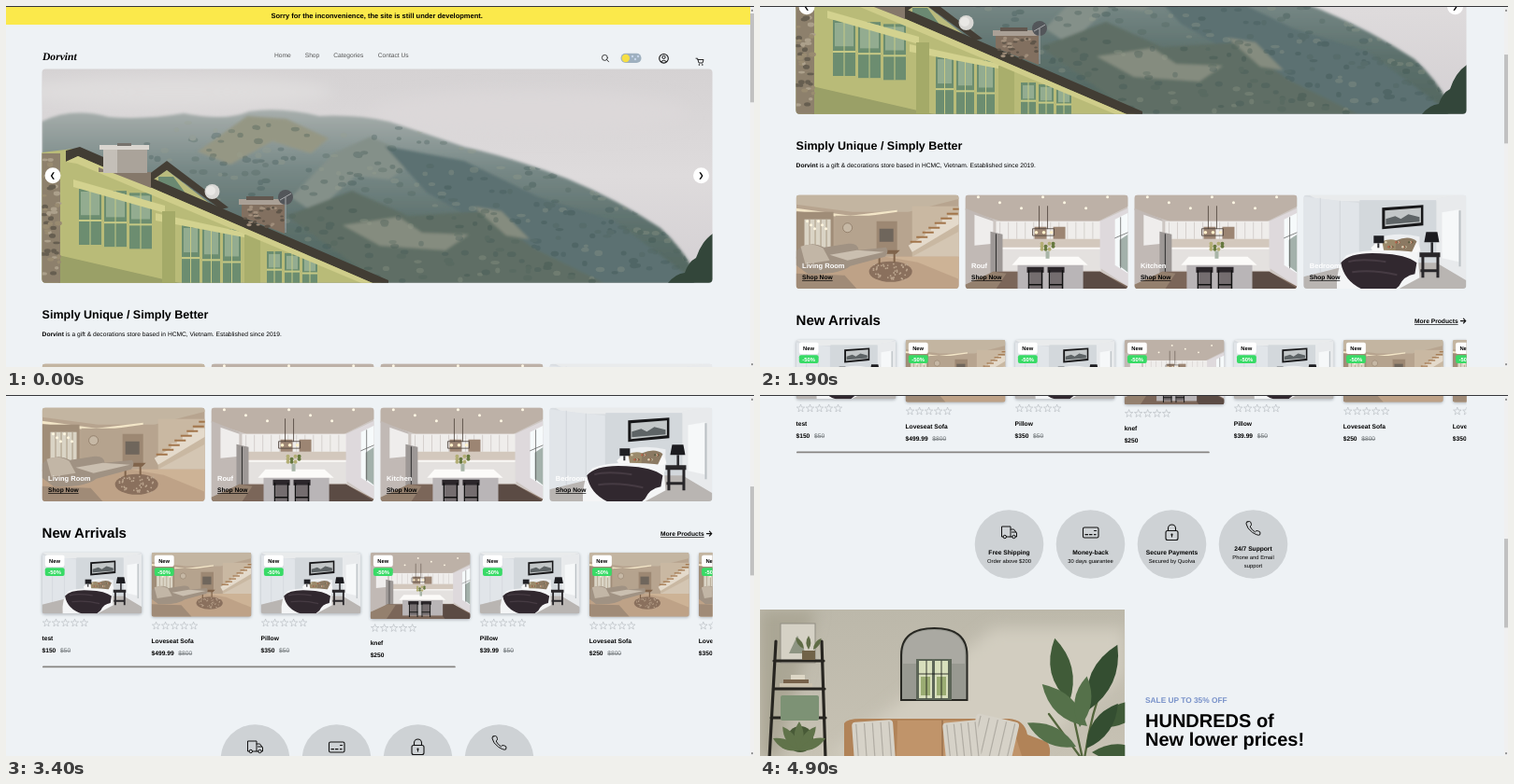
An HTML page for the animation above (5000 ms loop, 800 px wide and 387 px high).

```html
<!DOCTYPE html>
<html lang="en">
<head>
<meta charset="utf-8">
<title>Home decor store</title>
<style>
html, body { margin: 0; width: 100%; height: 100%; overflow: hidden; background: #eef2f5; }
svg { display: block; }
text { font-family: "Liberation Sans", Arial, sans-serif; text-rendering: geometricPrecision; }
.b { font-weight: bold; }
.u { font-weight: bold; text-decoration: underline; }
.m { text-anchor: middle; }
.line { fill: none; stroke: #111; stroke-linecap: round; stroke-linejoin: round; }
</style>
</head>
<body>
<script>
const rect = (x, y, w, h, fill, more = '') => `<rect x="${x}" y="${y}" width="${w}" height="${h}" fill="${fill}" ${more}/>`;
const circle = (x, y, r, fill, more = '') => `<circle cx="${x}" cy="${y}" r="${r}" fill="${fill}" ${more}/>`;
const path = (d, fill, more = '') => `<path d="${d}" fill="${fill}" ${more}/>`;
const line = (d, width = 1, more = '') => `<path d="${d}" class="line" stroke-width="${width}" ${more}/>`;
const text = (x, y, str, cls = '', size = 6.67, fill = '#000') =>
  `<text x="${x}" y="${y}" class="${cls}" font-size="${size}" fill="${fill}">${str}</text>`;
const at = (x, y, body) => `<g transform="translate(${x} ${y})">${body}</g>`;
const times = (n, f) => Array.from({ length: n }, (_, i) => f(i)).join('');

let seed = 7;
const rnd = (a, b) => a + (b - a) * ((seed = seed * 16807 % 2147483647) / 2147483647);

const gradient = (id, ...stops) => `<linearGradient id="${id}" x2="0" y2="1">${
  stops.map((c, i) => `<stop offset="${i / (stops.length - 1)}" stop-color="${c}"/>`).join('')}</linearGradient>`;

// Room pictures, all 174 wide
const rooms = {
  sofa: { h: 112, art: () =>
    rect(0, 0, 174, 112, '#b7a48f') +
    path('M0 0H174V10L120 24H60L0 16Z', '#c3b5a1') +
    path('M0 20L58 28L108 22V24L58 31L0 23Z', '#f3e6c8') +
    rect(0, 24, 40, 50, '#a08d78') + rect(9, 32, 28, 34, '#dad4c5') +
    times(4, i => rect(14 + i * 6, 32, 1, 34, '#a99a84')) +
    times(6, i => circle(12 + i * 4, 34 + i % 3 * 4, 1.5, '#fff6df')) +
    rect(42, 28, 44, 45, '#b5a38e') + circle(55, 41, 5, '#c6b8a5', 'stroke="#8d7965" stroke-width=".8"') +
    rect(86, 34, 22, 34, '#9d8873') + rect(89, 42, 15, 14, '#6f665c') +
    rect(124, 18, 50, 55, '#c9b8a2') +
    path('M120 60L138 49V44H144V40H150V36H156V32H162V28H174V37L124 67Z', '#e4dacb') +
    times(8, i => rect(122 + i * 6.5, 55 - i * 5, 12, 2, '#a2754b')) +
    path('M124 72L174 45V72Z', '#d4c6b3') +
    rect(0, 72, 174, 40, '#bea287') + path('M95 72H174V96L130 78Z', '#cdb396') +
    `<ellipse cx="101" cy="88" rx="23" ry="11" fill="#8a705d"/>` +
    times(50, () => circle(rnd(82, 120).toFixed(1), rnd(79, 97).toFixed(1), .9, '#bca68f')) +
    path('M84 65H111L107 69H88ZM88 68H90V80H88ZM104 68H106V78H104Z', '#80644b') +
    path('M5 62Q18 55 30 62L56 58Q66 57 67 65L96 62Q100 66 95 72L58 82Q45 92 12 90L0 81V66Z', '#a09283') +
    path('M5 61Q18 56 29 63L36 76L10 80Z', '#c2b6a6') +
    path('M36 70L65 65L94 67L55 76Z', '#cabfb0') +
    path('M0 90L52 92L70 112H0Z', '#a08b77') },
  kitchen: { h: 116, art: () =>
    rect(0, 0, 174, 116, '#cdc6c2') +
    path('M0 0H174V20L142 36H38L0 24Z', '#bdb1a7') +
    times(7, i => circle(14 + i * 23, 10 + i % 3 * 6, 1.5, '#fff7e4')) +
    path('M0 22L30 34V102L0 116Z', '#c1b9b5') + path('M10 29L30 36V60L10 62Z', '#efedec') +
    rect(33, 36, 112, 32, '#efedeb') + rect(33, 55, 112, 10, '#d3c8bd') +
    times(12, i => rect(37 + i * 9, 37, .6, 18, '#c4bdba')) +
    rect(74, 42, 13, 13, '#9c8573') + rect(94, 42, 13, 13, '#9c8573') +
    rect(33, 65, 112, 24, '#e4e1df') + rect(33, 64, 112, 2, '#f9f7f5') +
    path('M27 47L40 50V94L27 101Z', '#9d9896') + line('M33 50V96', .8, 'stroke="#443d39"') +
    path('M144 36L174 22V106L144 86Z', '#ded9dc') + path('M160 34L174 27V92L160 83Z', '#f6fafb') +
    path('M165 56L174 50V91L165 84Z', '#a3b1ab') + line('M160 54L174 48M166 32V86', .7, 'style="stroke:#555"') +
    path('M30 90H144L174 106V116H0V108Z', '#7b6659') + path('M110 90H144L174 108V116H130Z', '#5b4b44') +
    path('M0 104L30 90L44 92L28 116H0Z', '#94806e') +
    line('M72 51V44H95V51ZM79 44V20M88 44V20', .8, 'style="stroke:#4b4039"') + times(3, i => circle(76 + i * 8, 48, 1.8, '#fff1cb')) +
    path('M58 74H121L131 83H50Z', '#fcfbf9') + rect(56, 83, 70, 27, '#b9b5b7') +
    times(2, i => rect(66 + i * 22, 85, 18, 6, '#2b262a') + rect(69 + i * 22, 91, 13, 18, '#746d6f') +
      line(`M${68 + i * 22} 89V112M${82 + i * 22} 89V112M${68 + i * 22} 104H${82 + i * 22}`, 1.5)) +
    rect(86, 68, 4, 8, '#a8b5a7') + times(9, i => circle(82 + i % 4 * 4, 60 + i % 3 * 3, 2, i % 2 ? '#66783e' : '#b3ae75')) },
  bed: { h: 107, art: () =>
    rect(0, 0, 174, 107, '#d9dde1') + path('M0 0H174L150 10H18Z', '#e9ebec') +
    path('M0 5L60 12V78L0 91Z', '#e1e5e9') + line('M18 7V86M39 10V81M60 12V76', .5, 'style="stroke:#bfc4c9"') +
    rect(60, 9, 82, 67, '#d3d8dc') + path('M142 7L174 2V96L142 78Z', '#e8eaec') +
    path('M148 22L166 19V75L148 71Z', '#f6f8f9') + rect(166, 20, 2, 60, '#bac0c4') +
    path('M84 17L128 14V36L84 40Z', '#171719') + path('M87 20L125.500 17V33L87 37Z', '#c3c7c8') +
    path('M88 29L98 26L104 29L112 24L124 27V32L88 35Z', '#5e6466') +
    path('M0 91L60 76H142L174 95V107H0Z', '#b9b5b2') +
    path('M76 50Q100 42 124 48V72H76Z', '#edeff1') +
    path('M72 60Q83 48 94 59L90 67H76Z', '#f8f8f8') + path('M110 56Q122 48 125 63L113 70Z', '#f8f8f8') +
    path('M84 53Q96 48 104 55L100 66L86 64Z', '#9b8a6b') + path('M99 52Q113 46 121 53L115 66L98 66Z', '#8b7962') +
    times(18, i => circle(88 + i * 7 % 29, 54 + i * 5 % 10, 1.2, ['#d8cdb1', '#5d5c42', '#b4644c'][i % 3])) +
    path('M46 68Q70 59 122 65L124 92L96 107H36Q34 80 46 68Z', '#f4f5f6') +
    path('M40 76Q50 64 82 66Q110 67 121 76L119 88Q107 90 102 101L95 107H70Q44 99 40 76Z', '#31282f') +
    path('M48 75Q62 71 88 75M52 86Q74 83 100 89', 'none', 'stroke="#463b43" stroke-width="2"') +
    rect(75, 47, 11, 8, '#202024') + rect(79, 55, 2, 5, '#303034') +
    path('M131 43H143L145 54H129Z', '#1c1c20') + rect(136, 54, 2.5, 13, '#27272b') +
    path('M124 65H146V70H124ZM126 70H129V92H126ZM142 70H145V92H142ZM125 83H145V86H125Z', '#29272a') }
};

const room = (name, x, y, w, h) =>
  `<svg x="${x}" y="${y}" width="${w}" height="${h}" viewBox="0 0 174 ${rooms[name].h}" preserveAspectRatio="xMidYMid slice"><use href="#${name}"/></svg>`;

const header =
  rect(0, 0, 796, 20, '#fbe94b') +
  text(396.7, 13, 'Sorry for the inconvenience, the site is still under development.', 'b m', 7.5) +
  `<text x="39" y="57.5" font-size="11.6" font-weight="bold" font-style="italic" style="font-family:'Liberation Serif',serif">Dorvint</text>` +
  [['Home', 287], ['Shop', 319.7], ['Categories', 350.2], ['Contact Us', 397.7]]
    .map(([s, x]) => text(x, 54.6, s, '', 6.67, '#555')).join('') +
  line('M642.6 57.6L644.6 59.8M643.4 55.4A3 3 0 1 1 637.4 55.4A3 3 0 1 1 643.4 55.4', .8) +
  rect(657.5, 50.7, 22, 10.3, '#9eb0bf', 'rx="5.1"') + circle(662.8, 56, 4.2, '#f6df45') +
  times(3, i => circle(670 + i * 3, 54 + i % 2 * 3, 1.2, '#c7d7ec')) +
  circle(703.5, 56.3, 4.8, 'none', 'stroke="#111" stroke-width="1.1"') + circle(703.5, 54.9, 1.6, 'none', 'stroke="#111"') +
  line('M700.3 59.5Q703.5 56.9 706.7 59.5', 1) +
  line('M738 56.2H739.6L741 61H745L746 57.5H740', .9) + circle(741.4, 63, .8, '#111') + circle(744.8, 63, .8, '#111');

const mountain = 'M38 124Q70 108 110 119Q150 122 190 115Q235 124 260 113Q295 108 335 118Q375 116 410 124Q450 137 490 151Q540 162 600 185Q655 208 700 238Q722 258 736 284V297H38Z';
const pane = (x, y, w, h, n, slope) => times(n, i => {
  const px = x + i * w, py = y + i * w * slope;
  return rect(px, py, w - 3, h, '#6c8d70') + rect(px + 2, py + 3, w - 7, h * .42, '#93ac90') +
    rect(px, py + h * .55, w - 3, 2, '#c6c985') + rect(px + w / 2 - 2, py, 1, h, '#c6c985');
});
const dots = (n, x0, x1, y0, y1, r, colors) => times(n, i =>
  `<ellipse cx="${rnd(x0, x1).toFixed(1)}" cy="${rnd(y0, y1).toFixed(1)}" rx="${rnd(r / 2, r).toFixed(1)}" ry="${rnd(r / 3, r / 1.6).toFixed(1)}" fill="${colors[i % colors.length]}"/>`);

const hero = `<g clip-path="url(#heroClip)">` +
  rect(38, 67, 718, 231, 'url(#sky)') +
  `<g filter="url(#soft)"><ellipse cx="180" cy="92" rx="170" ry="17" fill="#dfdddd"/><ellipse cx="560" cy="115" rx="170" ry="24" fill="#dcd8d9"/></g>` +
  path(mountain, 'url(#hill)', 'filter="url(#soft2)"') +
  `<g clip-path="url(#hillClip)"><g filter="url(#soft2)">` +
  path('M205 156L258 118L300 121L345 142L326 158L285 145L240 170Z', '#959784') +
  path('M305 205L350 158L390 140L440 164L410 186L374 182L330 222Z', '#849089') +
  path('M405 150L490 166L570 205L650 230L740 297H560L520 240L450 200Z', '#5c7172') +
  path('M300 225L370 198L430 225L510 220L565 260L640 297H400Z', '#5e6e65') +
  path('M360 235L420 226L445 243L495 245L470 262L400 257ZM500 215L530 220L560 250L535 246Z', '#858c7f') +
  `</g><g opacity=".28" filter="url(#soft3)">` +
  dots(420, 150, 740, 125, 297, 5, ['#354c49', '#4b625c', '#9ba18f', '#3c5352']) + `</g></g>` +
  path('M708 297Q716 287 726 286Q730 274 738 270Q744 252 756 244V297Z', '#33463a') +
  path('M148 184L172 166L238 216L230 218L172 176L153 190Z', '#443e35') +
  path('M152 190L172 176L226 218L190 215Z', '#babb7d') + path('M163 183H179L195 205H163Z', '#6b8972') +
  path('M38 157L72 153L402 297H38Z', '#b9bb78') +
  pane(78, 196, 27, 60, 3, .08) + pane(188, 235, 22, 62, 3, .1) + pane(279, 263, 19, 34, 3, .1) +
  path('M72 186L170 214V222L72 194ZM160 222L270 246V251L160 230Z', '#d3d28f') +
  path('M56 267L186 297H56Z', '#9aa067') + rect(167, 220, 14, 77, '#a4aa68') + rect(255, 245, 17, 52, '#a9ae6c') +
  path('M64 155L79 151L409 294V297H392L77 161L64 167Z', '#423d34') +
  path('M64 167L77 161L392 297H380L76 169Z', '#cfcd8a') +
  rect(38, 158, 20, 139, '#8d806c') + dots(50, 39, 57, 160, 295, 4, ['#aca08b', '#665e50', '#998b71']) +
  path('M99 178H155V195L99 173Z', '#85786a') + rect(104, 153, 47, 26, '#aaa39a') + rect(104, 153, 15, 26, '#c4bfb8') +
  rect(100, 149, 53, 5, '#dad6d0') + rect(119, 147, 15, 3, '#77736d') +
  path('M252 212H298V244L252 226Z', '#827060') + dots(34, 255, 296, 215, 237, 3, ['#a18f7c', '#5f5549']) +
  rect(249, 207, 50, 6, '#aaa096') + rect(257, 204, 29, 4, '#61574f') +
  circle(299, 205, 8, '#53565a') + path('M293 208L305 201M299 205V243', 'none', 'stroke="#a8aaac"') +
  circle(220.5, 199, 8, '#d9d8d5') + circle(219, 198, 5, '#e9e8e5') + `</g>` +
  [[50, '❮'], [743.5, '❯']].map(([x, s]) => circle(x, 181.8, 8.5, '#fff') + text(x, 184.4, s, 'm', 7.5)).join('');

const intro =
  text(38.6, 335.4, 'Simply Unique / Simply Better', 'b', 12.5) +
  text(38.6, 354, '<tspan class="b">Dorvint</tspan> is a gift &amp; decorations store based in HCMC, Vietnam. Established since 2019.');

const categories = [['Living Room', 'sofa'], ['Rouf', 'kitchen'], ['Kitchen', 'kitchen'], ['Bedroom', 'bed']]
  .map(([name, pic], i) => at(38.5 + i * 180.9, 383.6,
    `<g clip-path="url(#cardClip)">${room(pic, 0, 0, 174.3, 100.3)}</g>` +
    text(6.6, 78.6, name, 'b', 7.5, '#fff') + text(6.6, 90.5, 'Shop Now', 'u'))).join('');

const star = 'M' + Array.from({ length: 10 }, (_, i) => {
  const a = Math.PI * (i / 5 - .5), r = i % 2 ? 1.8 : 4.4;
  return (r * Math.cos(a)).toFixed(2) + ' ' + (r * Math.sin(a)).toFixed(2);
}).join('L') + 'Z';

const goods = [
  ['test', '$150', '$50', 'bed'], ['Loveseat Sofa', '$499.99', '$800', 'sofa'], ['Pillow', '$350', '$50', 'bed'],
  ['knef', '$250', '', 'kitchen'], ['Pillow', '$39.99', '$50', 'bed'],
  ['Loveseat Sofa', '$250', '$800', 'sofa'], ['Loveseat Sofa', '$350', '$800', 'sofa']
].map(([name, price, old, pic], i) => {
  const h = 107 * rooms[pic].h / 174;
  return at(38.5 + i * 117.05, 538.8,
    rect(0, 1, 107, h, '#69727b', 'rx="3" opacity=".45" filter="url(#soft2)"') +
    `<g clip-path="url(#${pic}Clip)">${room(pic, 0, 0, 107, h)}</g>` +
    rect(3.3, 3, 20.8, 12.2, '#fff', 'rx="2"') + text(13.6, 11.2, 'New', 'b m', 5.83) +
    rect(3.3, 16.4, 20.8, 8.8, '#38db66', 'rx="2"') + text(13.6, 23, '-50%', 'b m', 5.83, '#fff') +
    times(5, n => at(5 + n * 10, h + 9.8, path(star, 'none', 'stroke="#b4b9be" stroke-width=".6"'))) +
    text(0, h + 28.2, name, 'b') +
    text(0, h + 41.3, `<tspan class="b">${price}</tspan><tspan dx="4.7" fill="#6c7275" text-decoration="line-through">${old}</tspan>`));
}).join('');

const arrivals =
  text(38.6, 523.4, 'New Arrivals', 'b', 15) + text(700, 521, 'More Products', 'u') +
  line('M749.4 518.6H754.6M752.4 516.2L754.8 518.6L752.4 521', 1.1) +
  `<g clip-path="url(#rowClip)">${goods}</g>` + rect(39, 660.5, 441.8, 1.8, '#878582', 'rx=".9"');

const perk = (i, icon, title, up, ...subs) => at(266.5 + i * 87, 760,
  circle(0, 0, 36.8, '#ced2d5') + at(0, -13 - up, icon) + text(0, 11.2 - up, title, 'b m') +
  subs.map((s, n) => text(0, 20.2 - up + n * 8.6, s, 'm', 5.83)).join(''));

const perks =
  perk(0, line('M-6.5 5H-8V-6H1.5V5H-3M1.5-3H5L8 1V5H6.8M1.5 5H3.2M3 0H7.3') +
    circle(-4.7, 5, 1.7, 'none', 'stroke="#111"') + circle(5, 5, 1.7, 'none', 'stroke="#111"'), 'Free Shipping', 0, 'Order above $200') +
  perk(1, rect(-8, -5, 16.5, 11, 'none', 'stroke="#111" stroke-width="1.1" rx="1.6"') + line('M4-1.5H6M-5.5 2.7H-3M-1 2.7H1.5M4 2.7H5.5', 1.2), 'Money-back', 0, '30 days guarantee') +
  perk(2, rect(-6.5, -1.5, 13, 10, 'none', 'stroke="#111" stroke-width="1.1" rx="2"') + line('M-4-1.5V-4A4 4 0 0 1 4-4V-1.5M0 3V5', 1.1) + circle(0, 2.7, 1.1, '#111'), 'Secure Payments', 0, 'Secured by Quolva') +
  perk(3, line('M-6.5-7L-4-7.5Q-2.5-7.5-2-4.5Q-1.7-3-3.4-2Q-1.4 2 2 3.8Q3 2 5 2.7Q8 3.5 7.5 5L7 7Q5 8-1 4.2Q-6.8 0-7.5-5Q-7.6-6.7-6.5-7Z', 1), '24/7 Support', 4, 'Phone and Email', 'support');

const leaf = (x, y, len, angle, fill) =>
  `<path transform="translate(${x} ${y}) rotate(${angle})" d="M0 0Q${-len * .34} ${-len * .5} 0 ${-len}Q${len * .3} ${-len * .5} 0 0" fill="${fill}"/>`;
const cushion = (x, y, w, h, tilt) => `<g transform="translate(${x} ${y}) rotate(${tilt})">` +
  rect(0, 0, w, h, '#d6d2c8', 'rx="4"') + times(5, i => rect(4 + i * w / 5, 2, 1.2, h - 4, '#b0aca3')) + `</g>`;

const sale = at(0, 830, `<g clip-path="url(#saleClip)">` +
  rect(0, 0, 390, 160, 'url(#wall)') +
  `<g filter="url(#soft)">${path('M70 160L250 20H390V70L280 160Z', '#d2cdc0')}${path('M0 0H60L20 160H0Z', '#aaa694')}</g>` +
  rect(22, 15, 37, 42, '#d5d1c5', 'stroke="#918e83"') + path('M31 47L40 28L49 47Z', '#8d9482') +
  line('M17 34L10 160M66 34L70 160M15 55H68M14 85H69M12 116H70', 3.2, 'style="stroke:#272520"') +
  rect(45, 44, 14, 10, '#716348') + [[47, 42, -35], [52, 43, 0], [57, 43, 35]].map(([x, y, a]) => leaf(x, y, 15, a, '#5f6c46')).join('') +
  rect(21, 79, 35, 4, '#cac1ad') + rect(25, 75, 27, 4, '#77624a') + rect(33, 70, 15, 5, '#ddd7c6') +
  rect(22, 92, 41, 27, '#7d9275', 'rx="2"') + circle(43, 139, 14, '#485a37') +
  [-65, -35, 0, 35, 65].map(a => leaf(42, 151, 31, a, '#60734a')).join('') +
  path('M151 97V49Q151 20 186.5 20Q221.5 20 221.5 49V97Z', '#989991', 'stroke="#272722" stroke-width="2"') +
  path('M153 48Q153 22 186 22Q219 22 219 48V58H153Z', '#aaa9a2') +
  rect(167, 53, 38, 44, '#5d6658') + times(2, i => rect(170 + i * 17, 55, 14, 40, '#d8dfbc') + rect(172 + i * 17, 72, 10, 20, '#9aac72')) +
  line('M170 69H201M178 55V95M194 55V95', .8) +
  path('M90 122Q93 117 108 117H266Q283 118 286 134L307 142Q312 148 309 160H90Z', '#b18358') +
  path('M147 119H268L281 160H146Z', '#c0946a') + line('M195 119V160', 1, 'style="stroke:#88613f"') +
  cushion(98, 121, 44, 44, -4) + cushion(232, 111, 47, 44, 13) + cushion(195, 122, 38, 42, -6) +
  line('M345 160Q337 121 328 84M347 160Q354 111 369 74M344 160L309 112', 2.3, 'style="stroke:#53653c"') +
  [[331, 99, 70, -13], [350, 125, 66, -47], [351, 108, 77, 24], [356, 126, 66, 66], [338, 147, 58, -64], [349, 149, 59, 35], [355, 153, 57, 92], [342, 126, 55, 8]]
    .map(([x, y, len, a], i) => leaf(x, y, len, a, ['#405b38', '#55714a', '#344e31'][i % 3])).join('') + `</g>`) +
  text(412, 929.9, 'SALE UP TO 35% OFF', 'b', 8.33, '#7891c9') +
  text(412, 956, 'HUNDREDS of', 'b', 20) + text(412, 976, 'New lower prices!', 'b', 20);

const clip = (id, body) => `<clipPath id="${id}">${body}</clipPath>`;
const blur = (id, s) => `<filter id="${id}" x="-20%" y="-30%" width="140%" height="160%"><feGaussianBlur stdDeviation="${s}"/></filter>`;
const defs = '<defs>' +
  gradient('sky', '#d5d2d3', '#dedbdc', '#d3cfd2') + gradient('hill', '#a7aeac', '#788987', '#5c706c', '#52665e') +
  gradient('wall', '#bcb8aa', '#c7c2b4') + blur('soft', 8) + blur('soft2', 1.6) + blur('soft3', .7) +
  clip('heroClip', rect(38.5, 67.5, 717, 229.3, '#000', 'rx="4"')) + clip('hillClip', path(mountain, '#000')) +
  clip('cardClip', rect(0, 0, 174.3, 100.3, '#000', 'rx="4"')) + clip('rowClip', rect(33, 530, 722.5, 150, '#000')) +
  clip('saleClip', rect(0, 0, 390.3, 160, '#000')) +
  Object.entries(rooms).map(([id, r]) => `<g id="${id}">${r.art()}</g>` +
    clip(id + 'Clip', rect(0, 0, 107, 107 * r.h / 174, '#000', 'rx="3"'))).join('') + '</defs>';

document.body.innerHTML = `<svg width="800" height="387" viewBox="0 0 800 387">${defs}` +
  rect(0, 0, 800, 387, '#eef2f5') + `<g id="page">${header + hero + intro + categories + arrivals + perks + sale}</g>` +
  rect(796, 0, 4, 387, '#f0f0f0') + rect(796, 8, 4, 95.3, '#c1c1c1', 'id="thumb"') +
  path('M796.8 5.5L798 3.5L799.2 5.5ZM796.8 383.5H799.2L798 385.5Z', '#555') +
  rect(0, 0, 800, 1, '#35363a') + '</svg>';

// [time, scroll offset]
const keys = [[0, 0], [500, 0], [600, 20], [800, 130], [900, 150], [1700, 150], [1800, 164], [2300, 251], [2500, 300],
  [3000, 300], [3100, 316], [3700, 423], [3900, 450], [4200, 450], [4300, 466], [4900, 600], [5000, 600]];
const scrollAt = t => {
  const i = keys.findIndex(k => k[0] > t), [t0, a] = keys[i - 1], [t1, b] = keys[i];
  return a + (b - a) * (t - t0) / (t1 - t0);
};

const page = document.getElementById('page'), thumb = document.getElementById('thumb');
const start = performance.now();
let last = -1;
function draw() {
  const t = Math.floor((performance.now() - start) % 5000 / 100) * 100;
  if (t !== last) {
    const y = Math.round(scrollAt(t));
    page.setAttribute('transform', `translate(0 ${-y})`);
    thumb.setAttribute('y', 8 + y * .2435);
    last = t;
  }
  requestAnimationFrame(draw);
}
draw();
</script>
</body>
</html>
```
